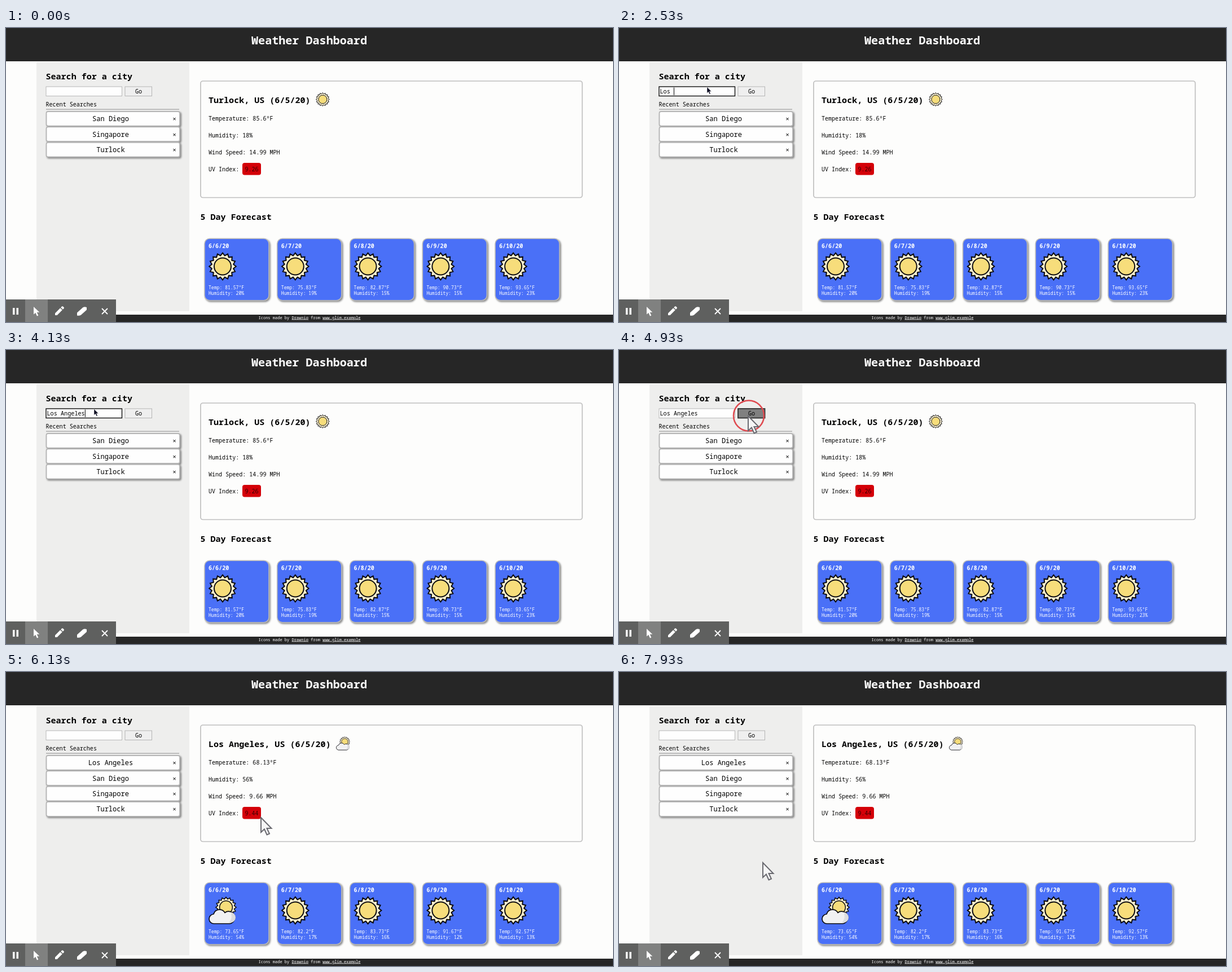
Recreate the animation shown at these times as an HTML page. Size 1076 by 521 pixels, loop 8 s.

```html
<!DOCTYPE html>
<html lang="en">
<head>
<meta charset="utf-8">
<title>Weather Dashboard</title>
<style>
  html, body { margin: 0; width: 100%; height: 100%; overflow: hidden; background: #fdfdfc; }
  svg { display: block; width: 1076px; height: 521px; }
  text { font-family: "Noto Sans Mono", "DejaVu Sans Mono", monospace; white-space: pre; }
  .raised { filter: drop-shadow(2px 2px 1.5px rgba(0, 0, 0, .45)); }
</style>
</head>
<body>
<svg id="stage" viewBox="0 0 1076 521"></svg>
<script>
const LOOP = 8000, TICK = 200, OFFSET = 130;
const FOCUS = 130, TYPE_START = 1930, CLICK = 4930, RELEASE = 5130, LOADED = 5330;
const QUERY = 'Los Angeles';

const places = [
  { name: 'Turlock', cloudy: false, temp: '85.6', humidity: 18, wind: '14.99', uv: '9.26',
    recent: ['San Diego', 'Singapore', 'Turlock'],
    days: [['81.57', 20], ['75.83', 19], ['82.87', 15], ['90.73', 15], ['93.65', 23]] },
  { name: 'Los Angeles', cloudy: true, temp: '68.13', humidity: 56, wind: '9.66', uv: '9.44',
    recent: ['Los Angeles', 'San Diego', 'Singapore', 'Turlock'],
    days: [['73.65', 54], ['82.2', 17], ['83.73', 16], ['91.67', 12], ['92.57', 13]] }
];

const text = (x, y, size, str, attrs = '') =>
  `<text x="${x}" y="${y}" font-size="${size}" ${attrs}>${str}</text>`;
const rect = (x, y, w, h, fill, attrs = '') =>
  `<rect x="${x}" y="${y}" width="${w}" height="${h}" fill="${fill}" ${attrs}/>`;
const bold = 'font-weight="700"';

// Icons are drawn around 0,0 in a 49 px square
function sun(transform) {
  const points = Array.from({ length: 32 }, (_, i) => {
    const a = i * Math.PI / 16, r = i % 2 ? 19.5 : 23.8;
    return (r * Math.sin(a)).toFixed(1) + ',' + (-r * Math.cos(a)).toFixed(1);
  }).join(' ');
  return `<g transform="${transform}" stroke="#0b0b10" stroke-width="2">
    <polygon points="${points}" fill="#fbf1cf"/><circle r="15" fill="#f7dd7b"/></g>`;
}

function weatherIcon(x, y, scale, cloudy) {
  const art = cloudy
    ? sun('translate(6 -5.5) scale(.76)') +
      `<path d="M-15 23.5a8.5 8.5 0 0 1-1-17a11 11 0 0 1 20-2.5a11 11 0 1 1 9 19.5z"
        fill="#f1f1f2" stroke="#0b0b10" stroke-width="1.7"/>
      <path d="M14 3q5 10-3 19h2a9.5 9.5 0 0 0 1-19z" fill="#dcdcde"/>`
    : sun('');
  return `<g transform="translate(${x} ${y}) scale(${scale})">${art}</g>`;
}

const recentItem = (name, i) => {
  const y = 148 + i * 27.4;
  return rect(71.5, y, 236.5, 25.6, '#fefefe', 'rx="3" stroke="#b5b5b5" stroke-width="1.8" class="raised"') +
    text(185.5, y + 17.2, 12.05, name, 'text-anchor="middle"') +
    text(298.5, y + 17.2, 11, '×', 'text-anchor="middle"');
};

const dayCard = ([temp, humidity], i, cloudy) => {
  const x = 352 + i * 128.8;
  return rect(x, 373.3, 114, 109.5, '#4a70f7', 'rx="9" stroke="#b9b9b9" stroke-width="1.6" class="raised"') +
    `<g fill="#fff">` + text(x + 7, 390, 10.1, `6/${6 + i}/20`, bold) +
    text(x + 7, 463.3, 8.1, `Temp: ${temp}°F`) +
    text(x + 7, 473.3, 8.1, `Humidity: ${humidity}%`) + '</g>' +
    weatherIcon(x + 32, 422.5, 1, cloudy);
};

function placeView(p, id) {
  const title = `${p.name}, US (6/5/20)`;
  return `<g id="place${id}">` + p.recent.map(recentItem).join('') +
    text(359, 132.7, 15.05, title, bold) +
    weatherIcon(381 + title.length * 9.02, 126.5, .5, p.cloudy) +
    text(359, 164, 10.05, `Temperature: ${p.temp}°F`) +
    text(359, 194, 10.05, `Humidity: ${p.humidity}%`) +
    text(359, 224, 10.05, `Wind Speed: ${p.wind} MPH`) +
    text(423.5, 254, 10.05, p.uv, 'fill="#3a0000"') +
    p.days.map((d, i) => dayCard(d, i, p.cloudy && i === 0)).join('') + '</g>';
}

const arrow = 'M0 0V26L6 20.5L10.5 30.5L15 28.5L10.5 19H18.5Z';

document.getElementById('stage').innerHTML =
  rect(0, 0, 1076, 521, '#fdfdfc') +
  rect(0, 0, 1076, 59, '#262626') +
  text(537.5, 28.7, 20.1, 'Weather Dashboard', bold + ' fill="#fff" text-anchor="middle"') +
  rect(54, 60, 271, 442, '#eeeeed') +
  text(70.5, 91.3, 15.05, 'Search for a city', bold) +
  rect(71, 104, 134.5, 16.5, '#fefefe', 'id="field"') +
  text(72.5, 116, 10.2, '', 'id="typed"') +
  rect(72.5, 105.5, 1, 13.5, '#000', 'id="caret"') +
  rect(211, 104, 47.5, 16.5, '#efefef', 'id="button"') +
  text(235, 116, 10.2, 'Go', 'text-anchor="middle"') +
  text(70.5, 139, 10.05, 'Recent Searches') +
  rect(71, 143.6, 236, 1, '#8c8c8c') +
  rect(345, 94, 676.5, 206.5, '#fdfdfc', 'rx="4" stroke="#bfbfbf" stroke-width="1.7"') +
  text(359, 254, 10.05, 'UV Index:') +
  rect(419, 239, 33, 21.5, '#d40008', 'rx="4"') +
  text(344.5, 340, 15.05, '5 Day Forecast', bold) +
  places.map(placeView).join('') +
  rect(0, 508, 1076, 13, '#262626') +
  text(447.5, 515.5, 7.02, 'Icons made by <tspan text-decoration="underline">Drawniq</tspan> from ' +
    '<tspan text-decoration="underline">www.glim.example</tspan>', 'fill="#fff"') +
  rect(0, 481, 195, 40, '#5f605f') + rect(34, 481, 40, 40, '#808180') +
  `<g fill="#fff">
    <path d="M12 496h3.5v12h-3.5zM18.5 496h3.5v12h-3.5z"/>
    <path d="M49 494V507.5L52.3 504.7L55 510.5L57.3 509.4L54.7 503.8H59.3Z"/>
    <path d="M87 509v-3.6l9.2-9.2l3.6 3.6l-9.2 9.2zM97.2 495.2l1.8-1.8q1-.8 2 0l1.6 1.6q.8 1 0 2l-1.8 1.8z"/>
    <path d="M126 504.5L136 495.5Q139 493.5 143 495V499.5L133 508.5Q130 510.5 126 509.5Z"/>
    <path d="M170 497l10 10m0-10l-10 10" stroke="#fff" stroke-width="1.8"/>
  </g>
  <path id="smallPointer" d="${arrow}" transform="translate(156 104.5) scale(.42)"
    fill="#101024" stroke="#fff" stroke-width="1"/>
  <circle id="ring" cx="230" cy="116.5" r="27" fill="none" stroke="#df4a50" stroke-width="2.6"/>
  <path id="pointer" d="${arrow}" fill="#f6f6f6" stroke="#6a6a70" stroke-width="2"/>`;

const $ = id => document.getElementById(id);
const show = (id, on) => { $(id).style.display = on ? '' : 'none'; };
const style = (id, attrs) => Object.entries(attrs).forEach(([k, v]) => $(id).setAttribute(k, v));

// Pointer stops: time, x, y
const path = [[4330, 156, 105], [4730, 229, 117], [5330, 229, 117], [6130, 452, 258],
  [6530, 452, 258], [7530, 255, 338], [8000, 255, 338]];

function pointerAt(t) {
  const i = Math.max(1, path.findIndex(p => p[0] > t));
  const [t0, x0, y0] = path[i - 1], [t1, x1, y1] = path[i];
  const u = Math.max(0, (t - t0) / (t1 - t0)), e = u * u * (3 - 2 * u);
  return [x0 + (x1 - x0) * e, y0 + (y1 - y0) * e];
}

function draw(now) {
  const raw = now % LOOP;
  const t = raw < OFFSET ? 0 : Math.floor((raw - OFFSET) / TICK) * TICK + OFFSET;
  const typed = t < TYPE_START || t >= LOADED ? 0
    : Math.min(QUERY.length, Math.floor((t - TYPE_START) / TICK) + 1);
  const focused = t >= FOCUS && t < CLICK;
  const pressed = t >= CLICK && t < RELEASE;
  const lastKey = typed ? TYPE_START + (typed - 1) * TICK : FOCUS;

  $('typed').textContent = QUERY.slice(0, typed);
  style('field', { stroke: focused ? '#101010' : '#b8b8b8', 'stroke-width': focused ? 1.4 : 1 });
  style('button', { fill: pressed ? '#808080' : '#efefef', stroke: pressed ? '#303030' : '#b5b5b5',
    'stroke-width': pressed ? 1.8 : 1 });
  show('caret', focused && (t - lastKey) % 1000 < 500);
  style('caret', { x: 72.5 + typed * 6.12 });

  show('place0', t < LOADED);
  show('place1', t >= LOADED);
  show('ring', pressed);
  show('smallPointer', t >= TYPE_START && t < path[0][0]);
  show('pointer', t >= path[0][0]);
  style('pointer', { transform: `translate(${pointerAt(t)})` });
  requestAnimationFrame(() => draw(performance.now()));
}
draw(0);
</script>
</body>
</html>
```
